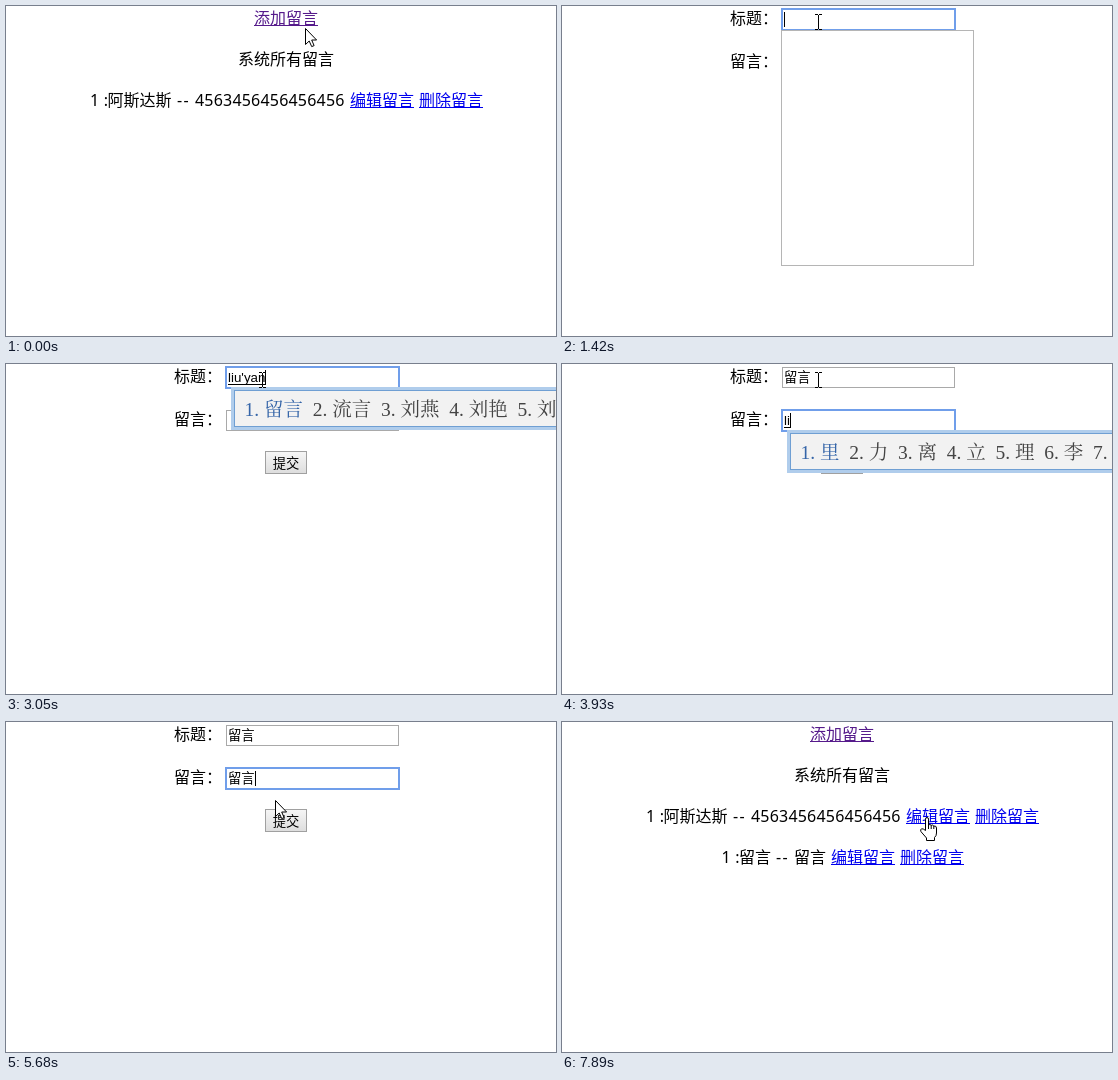
These frames come from a looping animation (550 by 330 pixels, 8000 ms). An HTML page:

```html
<!DOCTYPE html>
<html lang="zh-CN">
<head>
<meta charset="utf-8">
<title>留言</title>
<style>
  html, body { margin: 0; width: 100%; height: 100%; overflow: hidden; background: #fff; }
  svg { display: block; width: 550px; height: 330px; overflow: hidden; }
  text { white-space: pre; }
  .page { font: 16px "Noto Sans", "Noto Sans CJK SC", "Noto Sans CJK", sans-serif; }
  .digits { letter-spacing: .2px; }
  .hyphens { letter-spacing: 1.4px; }
  .small { font: 13.333px "Liberation Sans", "Noto Sans CJK SC", "Noto Sans CJK", sans-serif; }
  .ime { font: 19.5px "Liberation Serif", "Noto Serif CJK SC", "Noto Sans CJK SC", "Noto Sans CJK", serif; }
</style>
</head>
<body>
<svg id="stage" viewBox="0 0 550 330" xmlns="http://www.w3.org/2000/svg">
  <defs>
    <linearGradient id="face" x2="0" y2="1">
      <stop offset="0" stop-color="#f6f6f6"/><stop offset="1" stop-color="#dddddd"/>
    </linearGradient>
    <g id="arrow">
      <path d="M.5 .5V16.5L4.2 13L6.7 18.6L9.1 17.6L6.7 12H11.6Z" fill="#fff" stroke="#000"/>
    </g>
    <g id="beam">
      <path d="M-3 -7.5H0M1 -7.5H4M.5 -7V7M-3 7.5H0M1 7.5H4" fill="none" stroke="#000"/>
    </g>
    <g id="hand" transform="translate(-7 0)">
      <path d="M5.5 13.5V2.2Q5.5 .5 7 .5T8.5 2.2V8Q10 6.8 11.2 8.3Q12.8 7.4 13.8 9Q16.5 8.6 16.5 11V16Q16.5 19 14.5 20.5V23.5H6.5V21L1 14.7Q0 12.6 1.5 11.8Q3 11.3 5.5 13.5Z" fill="#fff" stroke="#000"/>
      <path d="M8.5 8V12M11.2 8.3V12M13.8 9V12" fill="none" stroke="#000"/>
    </g>
  </defs>
  <g id="list" class="page"></g>
  <g id="form"></g>
  <use id="cursor"/>
</svg>
<script>
const LOOP = 8000;
const $ = id => document.getElementById(id);

// [time, page]
const pages = [[0, 'first'], [430, 'form'], [6010, 'second']];

// [time, shape, x, y]
const moves = [
  [0, 'arrow', 299, 22], [100, 'hand', 296, 16], [210, 'hand', 293, 13],
  [540, 'beam', 291, 15], [650, 'beam', 284, 17], [760, 'arrow', 275, 26],
  [860, 'arrow', 269, 25], [970, 'arrow', 264, 25], [1080, 'beam', 259, 19],
  [1200, 'beam', 256, 16],
  [5460, 'arrow', 257, 32], [5570, 'beam', 262, 57], [5680, 'arrow', 269, 78],
  [5790, 'arrow', 274, 94], [5900, 'arrow', 275, 104], [6130, 'arrow', 274, 104],
  [6240, 'arrow', 273, 103], [6340, 'arrow', 273, 107], [6450, 'arrow', 273, 116],
  [6560, 'hand', 283, 128], [6670, 'hand', 279, 135], [6780, 'arrow', 272, 146],
  [6900, 'arrow', 271, 149],
  [7330, 'arrow', 274, 145], [7440, 'hand', 288, 132], [7550, 'arrow', 315, 118],
  [7660, 'arrow', 343, 106], [7780, 'hand', 360, 99], [7890, 'hand', 365, 95]
];

const WORD = '留言';
const choices = {
  "l": '了 力 来 啦 里 连 两',
  "li": '里 力 离 立 理 李 利',
  "liu": '六 流 留 刘 柳 溜 硫',
  "liu'y": '留言 留意 流域 流言 留影',
  "liu'ya": '留言 流言 刘燕 刘艳 刘雅',
  "liu'yan": '留言 流言 刘燕 刘艳 刘岩'
};

// [time, focused field, its text, option]
const typing = [
  [0, -1, ''], [1300, 0, ''], [1420, 0, '', 'menu'], [1850, 0, '', 'menu nocaret'],
  [2180, 0, "l"], [2280, 0, "li"], [2510, 0, "liu"], [2730, 0, "liu'y"],
  [3050, 0, "liu'yan"], [3280, 0, WORD], [3380, 1, ''],
  [3710, 1, "l"], [3820, 1, "li"], [4030, 1, "liu"], [4460, 1, "liu'y"],
  [4690, 1, "liu'ya"], [4790, 1, "liu'yan"], [4910, 1, WORD]
];

const at = (steps, t) => steps.reduce((last, step) => step[0] <= t ? step : last);

const text = (x, y, str, cls = '', fill = '#000') =>
  `<text x="${x}" y="${y}" class="${cls}" fill="${fill}">${str}</text>`;
const rect = (x, y, w, h, fill, stroke = 'none', line = 1) =>
  `<rect x="${x}" y="${y}" width="${w}" height="${h}" fill="${fill}" stroke="${stroke}" stroke-width="${line}"/>`;
const link = (x, y, str, color = '#0000ee') =>
  text(x, y, str, '', color) + rect(x, y + 1, 64, 1, color);

// Each run of text starts on a whole pixel.
function message(x, y, title, body, bodyWidth, cls) {
  const dash = Math.ceil(x + 17.5 + title.length * 16 + 4.8);
  const start = dash + 18;
  const edit = Math.ceil(start + bodyWidth + 4.4);
  return text(x, y, '1') + text(x + 13.8, y, ':') + text(x + 17.5, y, title) +
    text(dash, y, '--', 'hyphens') + text(start, y, body, cls) +
    link(edit, y, '编辑留言') + link(edit + 69, y, '删除留言');
}

function drawList(page) {
  let out = link(248, 18, '添加留言', '#551a8b') + text(232, 59, '系统所有留言') +
    message(84, 100, '阿斯达斯', '4563456456456456', 150.2, 'digits');
  if (page === 'second') out += message(159.4, 141, WORD, WORD, 32, '');
  return out;
}

function drawPopup(top, words) {
  const step = 9.75 * (words[0].length * 2 + 3);
  const items = words.map((word, i) => {
    const x = 238.5 + i * step;
    const color = i ? '#444444' : '#3565a8';
    return text(x, top + 29, `${i + 1}.`, 'ime', color) +
      text(x + 19.5, top + 29, word, 'ime', color);
  });
  return rect(225, top, 340, 43, '#b0cdec') +
    rect(228.5, top + 3.5, 340, 36, '#f2f2f2', '#6f9fd3') + items.join('');
}

const pen = document.createElement('canvas').getContext('2d');
pen.font = '13.333px "Liberation Sans", "Noto Sans CJK SC", sans-serif';

function drawForm([, focus, value, option = '']) {
  let out = '', popup = '';
  ['标题：', '留言：'].forEach((label, i) => {
    const top = 3 + 43 * i;
    const active = i === focus;
    const str = active ? value : i < focus ? WORD : '';
    const width = Math.round(pen.measureText(str).width);
    out += text(168, top + 15, label, 'page');
    out += active
      ? rect(220, top, 173, 21, '#fff', '#709eea', 2)
      : rect(220.5, top + .5, 172, 20, '#fff', '#a9a9a9');
    out += text(222, top + 15, str, 'small');
    if (!active) return;
    if (!option.includes('nocaret')) out += rect(222 + width, top + 3, 1, 15, '#000');
    if (choices[str]) {
      out += rect(222, top + 17, width, 1, '#000');
      popup = drawPopup(top + 20, choices[str].split(' '));
    }
  });
  out += rect(259.5, 87.5, 41, 22, 'url(#face)', '#a0a0a0') + text(266.7, 104, '提交', 'small');
  if (option.includes('menu')) out += rect(219.5, 24.5, 192, 235, '#fff', '#b5b5b5');
  return out + popup;
}

let shown = '';
function frame(now) {
  const t = now % LOOP;
  const page = at(pages, t)[1];
  const entry = at(typing, t);
  const [, shape, x, y] = at(moves, t);
  const key = page + entry[0];
  if (key !== shown) {
    shown = key;
    $('list').innerHTML = page === 'form' ? '' : drawList(page);
    $('form').innerHTML = page === 'form' ? drawForm(entry) : '';
  }
  $('cursor').setAttribute('href', '#' + shape);
  $('cursor').setAttribute('x', x);
  $('cursor').setAttribute('y', y);
}

const origin = performance.now();
function tick() {
  frame(performance.now() - origin);
  requestAnimationFrame(tick);
}
tick();
</script>
</body>
</html>
```
